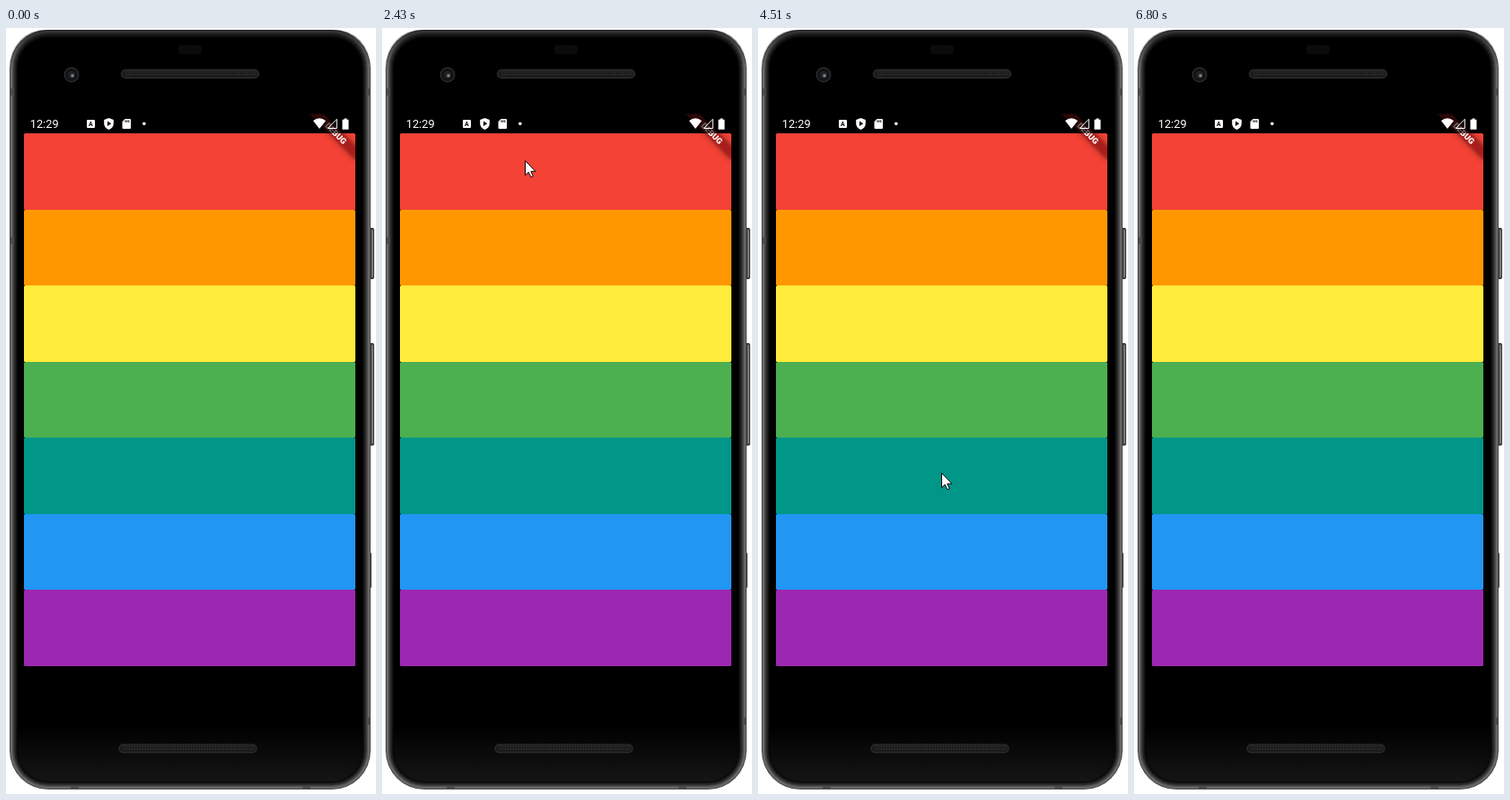
An HTML page with a canvas that plays this animation: 412 by 851 pixels, repeating every 7260 ms.

```html
<!DOCTYPE html>
<html lang="en">
<head>
<meta charset="utf-8">
<title>Rainbow buttons</title>
<style>
  html, body { margin: 0; width: 100%; height: 100%; overflow: hidden; background: #fff; }
  canvas { display: block; }
</style>
</head>
<body>
<canvas id="stage" width="412" height="851"></canvas>
<script>
const stage = document.getElementById('stage');
const LOOP = 7260;
const LEFT = 20, RIGHT = 389, WIDTH = RIGHT - LEFT;
const COLORS = ['#f44336', '#ff9800', '#ffeb3b', '#4caf50', '#009688', '#2196f3', '#9c27b0'];
const bandTop = i => Math.round(117.4 + 84.5 * i);

// Pointer path: time, x, y
const PATH = [
  [110, 316, 849], [460, 204, 638], [660, 204, 638], [860, 196, 652], [1110, 201, 638],
  [1390, 190, 580], [1710, 167, 144], [1980, 158, 145], [2400, 158, 145], [2780, 205, 231],
  [2880, 207, 233], [2960, 207, 233], [3300, 204, 328], [3470, 204, 328], [3620, 203, 423],
  [3900, 203, 423], [4140, 204, 492], [4480, 204, 492], [4850, 201, 570], [5040, 201, 570],
  [5170, 196, 654], [5220, 196, 664], [5320, 195, 672], [6380, 195, 672], [6790, 352, 849]
];
const TAPS = [
  { band: 0, press: 2090, release: 2210 },
  { band: 1, press: 2806, release: 2925 },
  { band: 2, press: 3340, release: 3450 },
  { band: 3, press: 3775, release: 3865 },
  { band: 4, press: 4170, release: 4260 },
  { band: 5, press: 4930, release: 5040 },
  { band: 6, press: 5425, release: 5521, end: 5660, tint: 0 }
];
const PAUSES = [[3630, 3770], [5520, 5660]];

const clamp = v => Math.max(0, Math.min(1, v));

function pointerAt(t) {
  const i = PATH.findIndex(p => p[0] > t);
  if (i < 0) return PATH.at(-1).slice(1);
  if (i === 0) return PATH[0].slice(1);
  const [t0, x0, y0] = PATH[i - 1], [t1, x1, y1] = PATH[i];
  const u = (t - t0) / (t1 - t0), e = u * u * (3 - 2 * u);
  return [x0 + (x1 - x0) * e, y0 + (y1 - y0) * e];
}

function box(c, x, y, w, h, r, fill) {
  c.beginPath();
  c.roundRect(x, y, w, h, r);
  c.fillStyle = fill;
  c.fill();
}

function disc(c, x, y, r, fill) {
  c.beginPath();
  c.arc(x, y, r, 0, 7);
  c.fillStyle = fill;
  c.fill();
}

function shape(c, path, fill, stroke) {
  const p = new Path2D(path);
  c.fillStyle = fill;
  c.fill(p);
  if (stroke) {
    c.strokeStyle = stroke;
    c.lineWidth = 1;
    c.stroke(p);
  }
}

function fade(c, y0, y1, from, to) {
  const g = c.createLinearGradient(0, y0, 0, y1);
  g.addColorStop(0, from);
  g.addColorStop(1, to);
  return g;
}

function speaker(c, x, y) {
  box(c, x, y, 154, 10, 5, '#353535');
  box(c, x + 1, y + 1, 152, 8, 4, '#1b1b1b');
  c.fillStyle = '#303030';
  for (let i = 5; i < 150; i += 3)
    for (let j = 2; j < 8; j += 3) c.fillRect(x + i, y + j, 1.5, 1.5);
}

function drawPhone(c) {
  // Side buttons
  for (const [y, h] of [[222, 57], [350, 114]]) {
    box(c, 403, y, 7, h, 2, '#3c3c3c');
    box(c, 407, y + 2, 2, h - 4, 1, '#777');
  }
  box(c, 403, 583, 4, 39, 1, '#444');

  // Metal rim, from the outside in
  [0x48, 0x6c, 0x66, 0x50, 0x3c, 0x2c, 0x20, 0x14, 0x08, 0].forEach((v, i) =>
    box(c, 4 + i, 2 + i, 402 - 2 * i, 844 - 2 * i, 43 - i, `rgb(${v},${v},${v})`));
  c.fillStyle = '#4a4a4a';
  for (const y of [67, 232]) c.fillRect(4, y, 5, 8);
  for (const y of [67, 766]) c.fillRect(401, y, 5, 8);
  for (const x of [72, 330]) c.fillRect(x, 842, 9, 4);
  box(c, 4, 2, 402, 40, [43, 43, 0, 0], fade(c, 2, 42, 'rgba(0,0,0,.55)', 'rgba(0,0,0,0)'));
  box(c, 13, 775, 384, 62, [0, 0, 34, 34], fade(c, 775, 837, '#000', '#151515'));

  box(c, 192, 19, 26, 10, 3, '#0b0b0c');
  disc(c, 73, 52, 8.5, '#2b2b2b');
  disc(c, 73, 52, 7, '#121212');
  disc(c, 73, 52, 4, '#1e2328');
  disc(c, 74, 53, 1.8, '#808488');
  speaker(c, 128, 46);
  speaker(c, 125.5, 795.5);
}

function drawBanner(c) {
  c.save();
  c.beginPath();
  c.rect(LEFT, 95.5, WIDTH, 60);
  c.clip();
  c.translate(RIGHT, 95.5);
  c.rotate(Math.PI / 4);
  c.filter = 'blur(3px)';
  box(c, -36, 25.1, 72, 10.8, 0, 'rgba(0,0,0,.5)');
  c.filter = 'none';
  box(c, -36, 25.1, 72, 10.8, 0, 'rgba(183,28,28,.63)');
  c.fillStyle = '#fff';
  c.font = '900 9.1px Roboto, sans-serif';
  c.textAlign = 'center';
  c.fillText('DEBUG', 0, 33.8);
  c.restore();
}

function drawStatus(c) {
  c.fillStyle = '#fff';
  c.font = '12.8px Roboto, sans-serif';
  c.fillText('12:29', 26.7, 111.3);
  box(c, 90, 102, 9, 9, 1, '#fff');
  c.fillStyle = '#000';
  c.font = 'bold 7px Roboto, sans-serif';
  c.fillText('A', 92.1, 109);
  shape(c, 'M114.5 100l5.3 2v4q0 5-5.3 7q-5.3-2-5.3-7v-4z', '#fff');
  shape(c, 'M113 103.6v5.4l4.2-2.7z', '#000');
  shape(c, 'M132.5 101h5.5q1 0 1 1v9q0 1-1 1h-7.5q-1 0-1-1v-7z', '#fff');
  c.fillStyle = '#000';
  for (const x of [132.5, 134.4, 136.3]) c.fillRect(x, 102.4, 1, 2.4);
  disc(c, 153.8, 106.3, 1.8, '#fff');
  shape(c, 'M342 103q7-5.6 14 0l-7 9z', '#fff');
  shape(c, 'M368.3 101.3v10.2h-10z', 'transparent', '#fff');
  shape(c, 'M376.5 100.5h3v1.2h2v11h-7v-11h2z', '#fff');
}

function drawRipple(c, tap, t) {
  const since = t - tap.release;
  if (t < tap.press || since > 200 || t >= (tap.end ?? LOOP)) return;
  const [x, y] = pointerAt(tap.press);
  const grown = (Math.min(t, tap.release) - tap.press) / 1000 + Math.max(0, since) / 212;
  const tint = (tap.tint ?? 0.06) * clamp((t - tap.press) / 50) * clamp(1 - since / 140);
  const top = bandTop(tap.band), height = bandTop(tap.band + 1) - top;
  c.save();
  c.beginPath();
  c.roundRect(LEFT, top, WIDTH, height, 2);
  c.clip();
  c.fillStyle = `rgba(0,0,0,${tint})`;
  c.fillRect(LEFT, top, WIDTH, height);
  disc(c, x, y, 190 * clamp(grown), `rgba(0,0,0,${0.13 * clamp(1 - since / 200)})`);
  c.restore();
}

function drawPointer(c, t) {
  if (t < 110 || t >= 6800) return;
  const [x, y] = pointerAt(t).map(Math.round);
  if (TAPS.some(tap => t >= tap.press && t < tap.release))
    disc(c, x, y, 12, 'rgba(255,255,0,.44)');
  c.save();
  c.translate(x + 0.5, y + 0.5);
  shape(c, 'M0 0V16.2L3.7 12.7L6.3 18.2L8.8 17.2L6.3 11.8H11.4Z', '#fff', '#000');
  c.restore();
}

// Everything that never changes is painted once
const still = document.createElement('canvas');
still.width = stage.width;
still.height = stage.height;
const base = still.getContext('2d');
drawPhone(base);
COLORS.forEach((color, i) =>
  box(base, LEFT, bandTop(i), WIDTH, bandTop(i + 1) - bandTop(i), 1.5, color));

const overlay = still.cloneNode();
const over = overlay.getContext('2d');
drawBanner(over);
over.fillStyle = 'rgba(0,0,0,.6)';
over.fillRect(LEFT, 95, WIDTH, 22);
drawStatus(over);

const ctx = stage.getContext('2d');
function frame() {
  let t = performance.now() % LOOP;
  const pause = PAUSES.find(([from, to]) => t >= from && t < to);
  if (pause) t = pause[0];
  ctx.clearRect(0, 0, stage.width, stage.height);
  ctx.drawImage(still, 0, 0);
  for (const tap of TAPS) drawRipple(ctx, tap, t);
  ctx.drawImage(overlay, 0, 0);
  drawPointer(ctx, t);
  requestAnimationFrame(frame);
}
frame();
</script>
</body>
</html>
```
